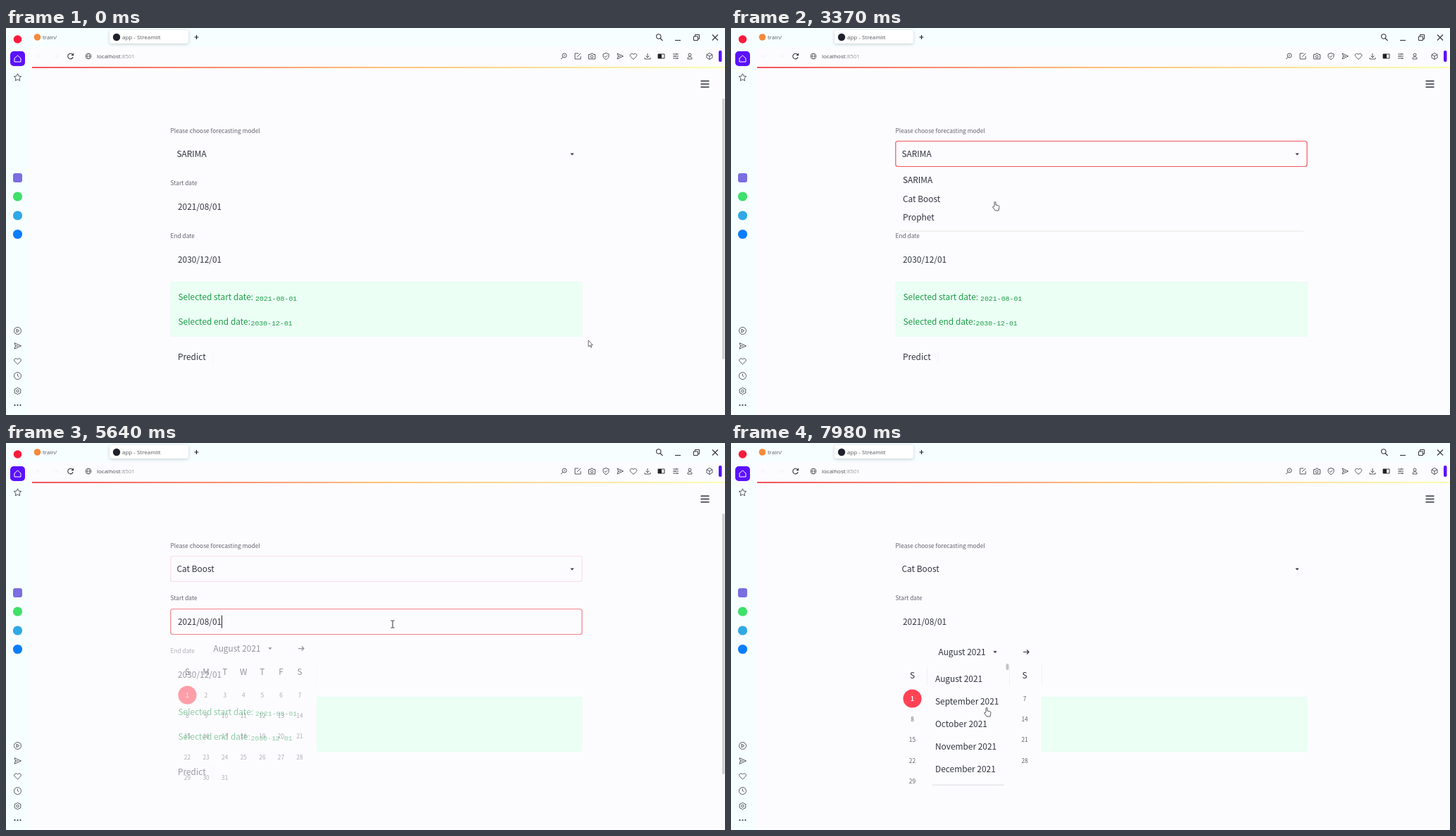
An HTML page with a canvas that plays this animation: 1021x549 px, repeating every 8000 ms.

```html
<!DOCTYPE html>
<html lang="en">
<head>
<meta charset="utf-8">
<style>
  html, body { margin: 0; width: 100%; height: 100%; overflow: hidden; background: #fcfcff; }
  canvas { display: block; }
</style>
</head>
<body>
<canvas id="stage" width="1021" height="549"></canvas>
<script>
const g = document.getElementById('stage').getContext('2d');
const LOOP = 8000;
const INK = '#31333f', SOFT = '#62636b', GREEN = '#1d9c45', PAGE = '#fcfcff';
const SANS = '"Noto Sans CJK JP", "Noto Sans CJK SC", "Noto Sans CJK", Lato, sans-serif';
const UI = '"Open Sans", "Noto Sans", sans-serif';
const MONO = '"Liberation Mono", monospace';
const BODY = 11.9, SMALL = 8.35;

const ramp = (t, from, to) => Math.max(0, Math.min(1, (t - from) / (to - from)));

// Text placed by its left edge and the middle of its capitals.
function text(s, x, y, size = BODY, color = INK, font = SANS, align = 'left', weight = 400) {
  g.font = `${weight} ${size}px ${font}`;
  g.textAlign = align;
  g.fillStyle = color;
  g.fillText(s, x, y + size * .36);
  return g.measureText(s).width;
}
function rect(x, y, w, h, fill, r = 0) {
  g.fillStyle = fill;
  g.beginPath();
  g.roundRect(x, y, w, h, r);
  g.fill();
}
function disc(x, y, r, fill) {
  g.fillStyle = fill;
  g.beginPath();
  g.arc(x, y, r, 0, 7);
  g.fill();
}
function icon(path, x, y, color = '#44464d', fill, width = .9) {
  const p = new Path2D(path);
  g.save();
  g.translate(x, y);
  g.lineWidth = width;
  g.strokeStyle = color;
  if (fill) { g.fillStyle = fill; g.fill(p); }
  g.stroke(p);
  g.restore();
}
function faded(alpha, draw) {
  if (alpha <= 0) return;
  g.save();
  g.globalAlpha = alpha;
  draw();
  g.restore();
}

const RING = 'M5 0A5 5 0 1 1-5 0A5 5 0 1 1 5 0Z';
const HEART = 'M0 4.5L-4.3 .3C-6-2-3-5.5 0-2.5C3-5.5 6-2 4.3 .3Z';
const SEND = 'M-4.5-4.2L5 0L-4.5 4.2L-3 0ZM-3 0H1';
const LENS = 'M2-1A3.2 3.2 0 1 1-4.4-1A3.2 3.2 0 1 1 2-1ZM1 1.5L4.5 5';
const CARET = 'M-2.4-1.2H2.4L0 1.4Z';

const toolbar = [
  [792, 'M4-1A3 3 0 1 1-2-1A3 3 0 1 1 4-1ZM-1 1.5L-4 4M0-1H2'],
  [812, 'M1-4H-4V4H4V0M-1 1L4-4'],
  [832, 'M-4.5-2.5H-2L-1-4H1L2-2.5H4.5V4H-4.5ZM1.8 .6A1.8 1.8 0 1 1-1.8 .6A1.8 1.8 0 1 1 1.8 .6'],
  [852, 'M0-4.5L4-3V0C4 2 2 4 0 4.6C-2 4-4 2-4 0V-3ZM-2 0L-.5 1.5L2-1.3'],
  [872, 'M-4-4L4.5 0L-4 4L-2.5 0ZM-2.5 0H1'],
  [891, HEART],
  [911, 'M0-4V2M-2.5-.5L0 2L2.5-.5M-4 2V4H4V2'],
  [951, 'M-4-3H4M-4 0H4M-4 3H4M1-4V-2M-1-1V1M2 2V4'],
  [971, 'M2-2A2 2 0 1 1-2-2A2 2 0 1 1 2-2ZM-3 4V3C-3 0 3 0 3 3V4Z'],
  [999, 'M0-4.5L4-2.3V2.3L0 4.5L-4 2.3V-2.3ZM-4-2.3L0 0L4-2.3M0 0V4.5']
];

function browser(scrollbar) {
  rect(0, 0, 1021, 549, '#f7feff');
  rect(34, 27, 987, 522, PAGE, [5, 0, 0, 0]);
  const line = g.createLinearGradient(37, 0, 1021, 0);
  line.addColorStop(0, '#f4505a');
  line.addColorStop(.5, '#ffc07a');
  line.addColorStop(1, '#fbffb0');
  rect(37, 55, 984, 2, line);

  // Tabs and address
  disc(44.5, 13, 4.8, '#f58a3c');
  text('train/', 52, 13, 8, '#55585e', UI);
  g.save();
  g.shadowColor = '#0003';
  g.shadowBlur = 4;
  g.shadowOffsetY = 1;
  rect(147, 3, 112, 19, '#fff', 3);
  g.restore();
  disc(157, 13, 5.2, '#20222c');
  text('app - Streamlit', 165, 13, 8, '#55585e', UI);
  icon('M-3 0H3M0-3V3', 270.5, 13, '#222', null, 1.2);
  icon('M3 0H-3M0-3L-3 0L0 3', 46, 40, '#f0f1f4');
  icon('M-3 0H3M0-3L3 0L0 3', 71, 40, '#f0f1f4');
  icon('M3.6-1.5A3.8 3.8 0 1 0 3.7 1.3M4-4V-1.3H1.3', 91.5, 40, '#33353b', null, 1.1);
  icon('M4 0A4 4 0 1 1-4 0A4 4 0 1 1 4 0ZM-4 0H4M0-4C-2.5-2-2.5 2 0 4C2.5 2 2.5-2 0-4', 117, 40, '#555', null, .8);
  const w = text('localhost', 129, 40, 8, '#4a4c52', UI);
  text(':8501', 129 + w, 40, 8, '#96989e', UI);

  // Window buttons and tools
  icon(LENS, 928, 13, '#33353b', null, 1.1);
  icon('M-4 4.5H4', 954, 13, '#33353b', null, 1.1);
  icon('M-4-1.5H2V4H-4ZM-2-1.5V-4H4V2H2', 980.5, 13.5, '#33353b', null, 1);
  icon('M-4-4L4 4M4-4L-4 4', 1007, 13.5, '#33353b', null, 1.1);
  toolbar.forEach(([x, path]) => icon(path, x, 40));
  icon('M-4.5-3H4.5V3H-4.5Z', 930.5, 40, '#222');
  rect(926, 37, 5, 6, '#222');
  rect(1012, 32, 4.5, 16, '#5a12ff', 2);

  // Sidebar
  disc(16.5, 16, 5.8, '#fb1b3c');
  rect(6, 33, 21, 21, '#5a12ff', 5);
  icon('M-4.5-.5L0-4.5L4.5-.5V4.5H-4.5Z', 16.5, 43.5, '#fff', null, 1);
  icon('M0-5.2L1.6-1.8L5.2-1.4L2.5 1.1L3.2 4.8L0 3L-3.2 4.8L-2.5 1.1L-5.2-1.4L-1.6-1.8Z', 16.5, 70);
  rect(10, 206, 13, 13, '#7a6ee0', 3);
  disc(16.5, 239, 6.6, '#3fe06b');
  disc(16.5, 266, 6.6, '#2fa8e6');
  disc(16.5, 292.5, 6.6, '#0a7dff');
  icon(RING + 'M-1.5-2.3L2.3 0L-1.5 2.3Z', 16.5, 429.5);
  icon(SEND, 16.5, 451);
  icon(HEART, 16.5, 472.5);
  icon(RING + 'M0-3V0L2 1.5', 16.5, 493.5);
  icon('M0-5L1.5-3.7L4.3-2.6V2.6L1.5 3.7L0 5L-1.5 3.7L-4.3 2.6V-2.6L-1.5-3.7ZM1.7 0A1.7 1.7 0 1 1-1.7 0A1.7 1.7 0 1 1 1.7 0', 16.5, 515);
  for (let i = -1; i < 2; i++) disc(16.5 + i * 4, 535, 1.1, '#333');

  icon('M-6-4.2H6M-6 0H6M-6 4.2H6', 992.5, 79.5, INK, null, 1.5);
  if (scrollbar) rect(1017, 100, 3.5, 370, '#cfd0d4', 1.7);
}

function field(y, focus) {
  faded(focus, () => {
    g.strokeStyle = '#f2555b';
    g.lineWidth = 1.2;
    g.beginPath();
    g.roundRect(233.8, y - 18, 584.2, 36, 3);
    g.stroke();
  });
}
const blink = (t, start) => Math.floor((t - start) / 500) % 2 == 0;
const textCursor = (x, y) => rect(x, y - 9, 1, 18, '#222');

function form(t, s) {
  const left = s.calendar > 0 ? 441 : 233.5;
  rect(left, 360, 818.5 - left, 78, '#e6f8f0', 2);
  rect(left + .5, 360.5, 817.5 - left, 77, '#ebfff5', 2);

  text('Please choose forecasting model', 233.5, 145.5, SMALL, SOFT);
  field(178.5, s.select);
  const catBoost = t >= 3900;
  text(catBoost ? 'Cat Boost' : 'SARIMA', 242.5, 179);
  icon(CARET, 804, 179, INK, INK, .2);
  if (t >= 2550 && t < 5600 && blink(t, 2550)) textCursor(catBoost ? 297 : 286, 178.5);

  field(253.5, s.start);
  faded(1 - s.models, () => {
    text('Start date', 233.5, 220, SMALL, SOFT);
    text('2021/08/01', 244, 254);
  });
  if (t >= 5600 && t < 7480 && (t < 5710 || blink(t, 5710))) textCursor(306, 253.5);

  faded(1 - s.calendar, () => {
    text('End date', 233.5, 294.5, SMALL, SOFT);
    text('2030/12/01', 244, 328.5);
    text('Selected start date:', 244.5, 382, BODY, GREEN);
    text('2021-08-01', 354, 383.5, 9.9, GREEN, MONO);
    text('Selected end date:', 244.5, 416.5, BODY, GREEN);
    text('2030-12-01', 347.5, 418, 9.9, GREEN, MONO);
    text('Predict', 244, 466.5);
    rect(293.5, 457, 1, 20, '#f3f3f6');
  });
}

function modelList() {
  rect(240, 287.5, 573, 1.5, '#eeeeea');
  ['SARIMA', 'Cat Boost', 'Prophet'].forEach((m, i) => text(m, 244, 216 + 26.5 * i));
}

function calendar(dy) {
  rect(441, 313, 1, 31, '#f3f3f6');
  g.translate(0, dy);
  text('August 2021', 294.5, 297);
  icon(CARET, 375, 296.5, INK, INK, .2);
  icon('M-4 0H4M1-3L4 0L1 3', 419, 296.5, INK, null, 1.2);
  const column = i => 257.5 + 26.6 * (i % 7);
  [...'SMTWTFS'].forEach((d, i) => text(d, column(i), 330, BODY, INK, SANS, 'center'));
  disc(257.5, 362.5, 13.1, '#ff4355');
  for (let d = 0; d < 31; d++)
    text(d + 1, column(d), 362.8 + 29.3 * Math.floor(d / 7), SMALL,
      d ? SOFT : '#fff', SANS, 'center', d ? 400 : 700);
}

function monthList() {
  rect(278, 313, 117, 173, PAGE);
  rect(278, 318, 1, 27, '#f0f0f3');
  rect(395, 318, 1, 27, '#f0f0f3');
  rect(286, 484.5, 102, 1.5, '#e6e6ea');
  rect(390.5, 313, 4, 9, '#c4c4c8', 2);
  ['August', 'September', 'October', 'November', 'December'].forEach((m, i) =>
    text(m + ' 2021', 290, 335 + 32 * i));
}

function running() {
  icon('M-7-3.5H7M0-3.5V2M-1.8 2V8.5M1.8 2V8.5', 869, 79, '#b4b5ba', null, 2.3);
  rect(866.5, 75, 5, 6, '#b4b5ba');
  disc(869, 72.3, 2.1, '#b4b5ba');
  text('RUNNING...', 886, 79, 8, '#e3e4e8');
  text('Stop', 947, 79, SMALL, SOFT);
}

// Pointer stops: time, x, y
const stops = [
  [0, 827, 443], [870, 827, 443], [1670, 706, 236], [2070, 703, 187], [2640, 703, 187],
  [3340, 375, 248], [3370, 375, 248], [3530, 381, 258], [3710, 352, 252], [4710, 352, 252],
  [5480, 549, 257], [5660, 549, 257], [6410, 355, 312], [6640, 355, 312], [7040, 372, 296],
  [7560, 372, 296], [7980, 363, 377], [8000, 363, 377]
];
function pointer(t, s) {
  const i = stops.findIndex(p => p[0] > t);
  const [t0, x0, y0] = stops[i - 1], [t1, x1, y1] = stops[i];
  const k = ramp(t, t0, t1), e = k * k * (3 - 2 * k);
  const x = x0 + (x1 - x0) * e, y = y0 + (y1 - y0) * e;
  const overCalendar = s.calendar > 0 && x < 441 && y > 273;
  const hand = s.models > 0 && y > 200 || overCalendar && (y < 304 || s.months > 0);
  const overField = [178.5, 253.5, 328].some(c => Math.abs(y - c) < 18) && x < 818;
  if (hand)
    icon('M-1 5V-.5C-1-2 1-2 1-.5V3L4.5 3.8C6 4 6 5 5.8 6.5L5 11H.3L-2.8 7C-4 5.3-2.5 4.5-1 6', x, y, '#444', '#fff');
  else if (overField && !overCalendar)
    icon('M-2.5-5H-.7L0-4.5L.7-5H2.5M0-4.5V4.5M-2.5 5H-.7L0 4.5L.7 5H2.5', x, y, '#333', null, 1);
  else
    icon('M0 0V9L2 7.2L3.5 10.3L4.8 9.7L3.4 6.7H6.2Z', x, y, '#444', '#fff', .8);
}

function frame(now) {
  const t = now % LOOP;
  const s = {
    select: ramp(t, 2530, 2640) * (1 - ramp(t, 5600, 5650)),
    models: ramp(t, 2540, 2670) * (1 - ramp(t, 3870, 3990)),
    start: ramp(t, 5590, 5660) * (1 - ramp(t, 7480, 7640)),
    calendar: ramp(t, 5595, 5685),
    months: ramp(t, 7490, 7620)
  };
  // The page cannot scroll while a popup is open.
  browser(s.models < 1 && s.calendar < 1);
  form(t, s);
  faded(s.models, modelList);
  faded(s.calendar, () => calendar(-5 * (1 - ramp(t, 5640, 5800))));
  faded(s.months, monthList);
  faded(ramp(t, 4250, 4400) * (1 - ramp(t, 4710, 4850)), running);
  pointer(t, s);
  requestAnimationFrame(frame);
}
requestAnimationFrame(frame);
</script>
</body>
</html>
```
